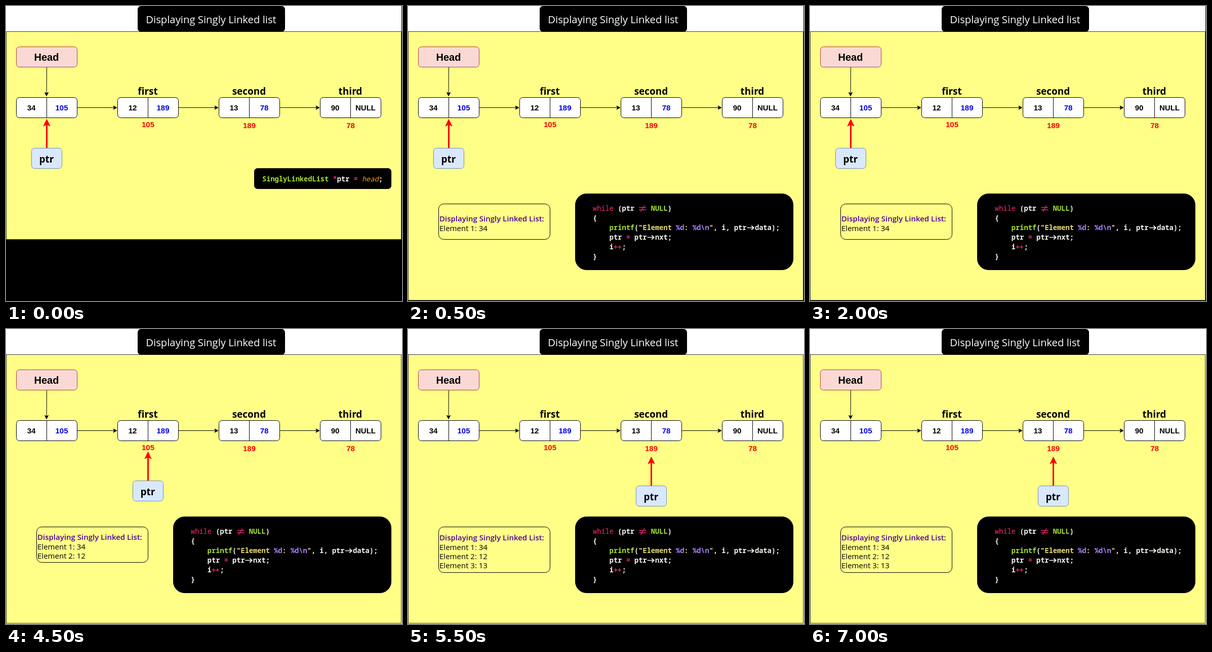
An HTML page for the animation above (8000 ms loop, 782 px wide and 582 px high).

```html
<!DOCTYPE html>
<html lang="en">
<head>
<meta charset="utf-8">
<title>Displaying Singly Linked list</title>
<style>
html, body { margin: 0; width: 100%; height: 100%; overflow: hidden; background: #fff; }
svg { display: block; width: 782px; height: 582px; }
text { font: bold 15px "Liberation Sans", Arial, sans-serif; }
.mid { text-anchor: middle; }
.hand { font: 700 19px "Open Sans", "Noto Sans", sans-serif; }
.title { font: 400 20.3px "Open Sans", "Noto Sans", sans-serif; fill: #fff; }
.head { font-size: 20px; }
.out { font: 400 15px "Open Sans", "Noto Sans", sans-serif; }
.cap { font-weight: 600; fill: #4c0099; }
.code { font: 600 13.68px "Noto Sans Mono", "DejaVu Sans Mono", monospace; fill: #f8f8f2; }
.key { fill: #f92672; font-weight: 400; }
.op { fill: #f92672; }
.name { fill: #a6e22e; }
.str { fill: #e6db74; }
.fmt { fill: #ae81ff; }
.arg { fill: #fd971f; font-style: italic; font-weight: 400; }
</style>
</head>
<body>
<svg id="stage" viewBox="0 0 782 582"></svg>
<script>
const NS = "http://www.w3.org/2000/svg";
const stage = document.getElementById("stage");
const CELL = 8.21;

function add(parent, tag, attrs = {}, content) {
  const el = document.createElementNS(NS, tag);
  for (const key in attrs) el.setAttribute(key, attrs[key]);
  if (content !== undefined) el.textContent = content;
  parent.appendChild(el);
  return el;
}
const group = () => add(stage, "g");
const box = (parent, x, y, width, height, rx, fill, stroke = "#000") =>
  add(parent, "rect", { x: x + .5, y: y + .5, width, height, rx, fill, stroke });
const label = (parent, x, y, str, cls = "", fill) =>
  add(parent, "text", { x, y, class: cls, ...(fill && { fill }) }, str);
const line = (parent, d, stroke = "#000", width = 1) =>
  add(parent, "path", { d, stroke, "stroke-width": width, fill: "none" });
const solid = (parent, d, fill = "#000") =>
  add(parent, "path", { d, fill, stroke: fill, "stroke-linejoin": "miter" });

// Each part of a code line is [text, class].
function code(parent, x, y, parts) {
  const row = label(parent, x, y, "", "code");
  for (const [str, cls = ""] of parts)
    add(row, "tspan", { class: cls }, str.replace(/ /g, "\u00a0"));
}

// Backdrop and panel
const backdrop = add(stage, "rect", { width: 782, height: 582 });
add(stage, "rect", { width: 781, height: 51, fill: "#fff" });
const panel = box(stage, 0, 50, 780, 530, 0, "#ffff88", "#36393d");
box(stage, 260, 0, 290, 50, 6, "#000");
label(stage, 405, 34, "Displaying Singly Linked list", "title mid");

// List
box(stage, 20, 80, 120, 40, 6, "#fad9d5", "#ae4132");
label(stage, 80, 108, "Head", "head mid");
line(stage, "M80.5 121L80.1 172");
solid(stage, "M80 177.5l-3.4-7 3.4 1.8 3.6-1.8z");

const nodes = [
  ["34", "105"],
  ["12", "189", "first", "105", 239],
  ["13", "78", "second", "189", 241],
  ["90", "NULL", "third", "78", 241]
];
nodes.forEach(([value, next, name, address, addressY], i) => {
  const x = 20 + 200 * i;
  const last = i === nodes.length - 1;
  box(stage, x, 180, 120, 40, 6, "#fff");
  line(stage, `M${x + 60.5} 180V221`);
  label(stage, x + 30, 206, value, "mid");
  label(stage, x + 90, 206, next, "mid", last ? "#000" : "#0000e6");
  if (name) {
    label(stage, x + 60, 174.5, name, "hand mid");
    label(stage, x + 60.5, addressY, address, "mid", "#ff0000");
  }
  if (!last) {
    line(stage, `M${x + 121} 200.5H${x + 194}`);
    solid(stage, `M${x + 199} 200.5l-7-3.5 1.8 3.5-1.8 3.5z`);
  }
});

// Moving pointer
const pointer = group();
line(pointer, "M80.5 280V233", "#ff0000", 3);
solid(pointer, "M80.5 223.5l6.5 13.5-6.5-3.3-6.5 3.3z", "#ff0000");
box(pointer, 50, 280, 60, 40, 6, "#dae8fc", "#6c8ebf");
label(pointer, 80, 308.5, "ptr", "hand mid");

// Opening statement
const intro = group();
box(intro, 490, 320, 270, 40, 6, "#000");
code(intro, 506, 346, [
  ["SinglyLinkedList", "name"], [" "], ["*", "op"], ["ptr "], ["=", "op"],
  [" "], ["head", "arg"], [";"]
]);

// Loop listing; wide blanks leave room for the joined operators
const loop = group();
box(loop, 330, 370, 430, 150, 22, "#000");
[
  [["while", "key"], [" (ptr    "], ["NULL", "name"], [")"]],
  [["{"]],
  [["    "], ["printf", "name"], ["("], ["\"Element ", "str"], ["%d", "fmt"], [": ", "str"],
    ["%d\\n", "fmt"], ["\"", "str"], [", i, ptr  data);"]],
  [["    ptr "], ["=", "op"], [" ptr  nxt;"]],
  [["    i  ;"]],
  [["}"]]
].forEach((parts, i) => code(loop, 365, 404 + 19 * i, parts));

const column = n => 365 + CELL * n;
line(loop, `M${column(11) + 1} 397.5h14m-14 4.5h14m-11 4l8-13`, "#f92672", 1.3);
const arrow = (n, y) =>
  line(loop, `M${column(n) + 1} ${y}h13m-4.5-4l4.5 4-4.5 4`, "#f8f8f2", 1.7);
arrow(37, 437.5);
arrow(13, 456.5);
line(loop, `M${column(5) + .8} 475.5h6.6m-3.3-3.5v7m4.2-3.5h6.6m-3.3-3.5v7`, "#f92672", 1.4);

// Printed output
const output = group();
const frame = box(output, 60, 390, 220, 70, 10, "none");
const caption = label(output, 62, 425, "Displaying Singly Linked List:", "out cap");
const rows = [34, 12, 13].map((n, i) =>
  label(output, 62, 0, `Element ${i + 1}: ${n}`, "out"));

const PERIOD = 8000;
const steps = [
  { at: 0, move: [0, 0], count: 0, back: "#000" },
  { at: 500, move: [0, 0], count: 1, top: 425, height: 70, back: "#000" },
  { at: 3000, move: [200, 19], count: 2, top: 416, height: 70, back: "#fff" },
  { at: 5500, move: [400, 29], count: 3, top: 417, height: 90, back: "#fff" }
];
const show = (el, on) => el.setAttribute("visibility", on ? "visible" : "hidden");

function apply({ move, count, top, height, back }) {
  const running = count > 0;
  backdrop.setAttribute("fill", back);
  panel.setAttribute("height", running ? 530 : 410);
  pointer.setAttribute("transform", `translate(${move})`);
  show(intro, !running);
  show(loop, running);
  show(output, running);
  rows.forEach((row, i) => show(row, i < count));
  if (!running) return;
  frame.setAttribute("height", height);
  caption.setAttribute("y", top);
  rows.forEach((row, i) => row.setAttribute("y", top + 19 + 18 * i));
}

const start = performance.now();
let current;
function tick() {
  const t = (performance.now() - start) % PERIOD;
  const step = steps.filter(s => s.at <= t).pop();
  if (step !== current) apply(current = step);
  requestAnimationFrame(tick);
}
tick();
</script>
</body>
</html>
```
